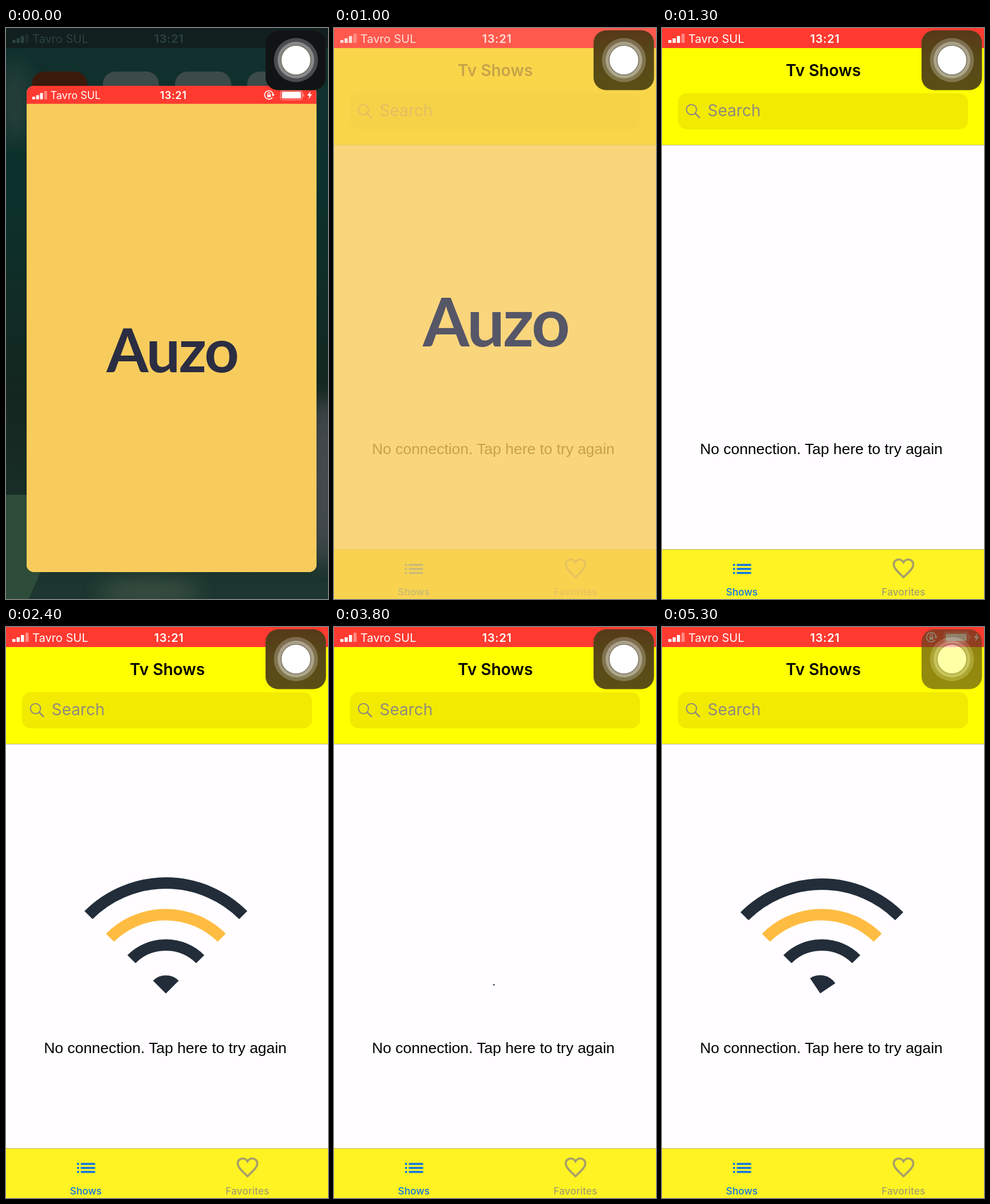
An HTML page for the animation above (5400 ms loop, 562x997 px).

```html
<!DOCTYPE html>
<html lang="en">
<head>
<meta charset="utf-8">
<title>No connection</title>
<style>
  html, body { margin: 0; width: 100%; height: 100%; overflow: hidden; background: #12302b; }
  svg { display: block; width: 100%; height: 100%; }
  text { font-family: Inter, Roboto, sans-serif; }
  .carrier { font-size: 20px; }
  .time { font-size: 20px; font-weight: 600; letter-spacing: .7px; text-anchor: middle; }
  .title { font-size: 28px; font-weight: 600; text-anchor: middle; }
  .search { font-size: 28px; fill: #8f8b7d; }
  .note { font: 26.4px "Liberation Sans", Arial, sans-serif; text-anchor: middle; }
  .tab { font-size: 17px; font-weight: 500; letter-spacing: .2px; text-anchor: middle; }
  .brand { font: 700 117px Lato, sans-serif; letter-spacing: -3px; text-anchor: middle; fill: #2b2d42; }
  .arc { fill: none; stroke: #232d3a; stroke-width: 20; }
</style>
</head>
<body>
<svg viewBox="0 0 562 997" preserveAspectRatio="none">
  <defs>
    <linearGradient id="sea" x2="0" y2="1">
      <stop offset="0" stop-color="#12302e"/>
      <stop offset=".3" stop-color="#0c312c"/>
      <stop offset=".65" stop-color="#14261f"/>
      <stop offset="1" stop-color="#1d3630"/>
    </linearGradient>
    <linearGradient id="glass" x2="0" y2="1">
      <stop offset="0" stop-color="#56391a"/>
      <stop offset=".45" stop-color="#584817"/>
      <stop offset="1" stop-color="#5a4f15"/>
    </linearGradient>
    <filter id="soft" x="-50%" y="-50%" width="200%" height="200%"><feGaussianBlur stdDeviation="16"/></filter>
    <clipPath id="crop"><rect id="cropBox" width="562" height="997"/></clipPath>
    <g id="statusLeft">
      <path d="M11 21h5.500v5h-5.500zM18.500 18h5.500v8h-5.500zM26 14h5.500v12h-5.500z"/>
      <path d="M34 10h5.500v16h-5.500z" opacity=".4"/>
      <text class="carrier" x="46" y="25.500">Tavro SUL</text>
      <text class="time" x="284.500" y="25.500">13:21</text>
    </g>
  </defs>

  <g id="home">
    <rect width="562" height="997" fill="url(#sea)"/>
    <g filter="url(#soft)">
      <ellipse cx="555" cy="790" rx="28" ry="150" fill="#474c50"/>
      <ellipse cx="15" cy="130" rx="30" ry="70" fill="#243d38"/>
      <ellipse cx="250" cy="985" rx="90" ry="22" fill="#38503f"/>
    </g>
    <path d="M0 815h60v135l-20 47h-40z" fill="#2d4c39"/>
    <rect width="562" height="35" fill="#111f1f"/>
    <use href="#statusLeft" fill="#2b4340"/>
    <rect x="45" y="76" width="97" height="97" rx="22" fill="#3b1a0c"/>
    <g fill="#3d4a4a">
      <rect x="169" y="76" width="98" height="97" rx="22"/>
      <rect x="295" y="76" width="98" height="97" rx="22"/>
      <rect x="421" y="76" width="98" height="97" rx="22"/>
    </g>
  </g>

  <g id="card"><g clip-path="url(#crop)">
    <rect width="562" height="997" fill="#fffdff"/>
    <rect y="35" width="562" height="169" fill="#ff0"/>
    <path d="M0 204.500h562" stroke="#b9b7a0"/>
    <text class="title" x="281.500" y="84">Tv Shows</text>
    <rect x="28" y="114" width="506" height="63" rx="15" fill="#f2ea00"/>
    <g fill="none" stroke="#8f8b7d" stroke-width="2">
      <circle cx="51.500" cy="142.500" r="8.800"/>
      <path d="M58 149l8 8" stroke-width="2.500"/>
    </g>
    <text class="search" x="79.500" y="154">Search</text>

    <g id="wifi">
      <path class="arc" pathLength="1" d="M219 580A85 85 0 0 1 339 580"/>
      <path class="arc" pathLength="1" d="M181.500 542.500A138 138 0 0 1 376.500 542.500" style="stroke:#ffbc42"/>
      <path class="arc" pathLength="1" d="M144 505A191 191 0 0 1 414 505"/>
    </g>
    <path id="dot" d="M279 640L256.500 617.500A31.800 31.800 0 0 1 301.500 617.500Z" fill="#232d3a"/>
    <text class="note" x="278" y="744">No connection. Tap here to try again</text>

    <rect y="910" width="562" height="87" fill="#fff324"/>
    <path d="M0 910.500h562" stroke="#b9b26a"/>
    <path d="M124 937.500h3.500M130.500 937.500h25M124 944.500h3.500M130.500 944.500h25M124 951.500h3.500M130.500 951.500h25" stroke="#0b74e5" stroke-width="3.400"/>
    <path d="M421.500 959C411 949 404.500 943.500 404.500 936.500C404.500 931.500 408.500 928 413 928C416.500 928 419.500 930 421.500 933C423.500 930 426.500 928 430 928C434.500 928 438.500 931.500 438.500 936.500C438.500 943.500 432 949 421.500 959Z" fill="none" stroke="#a69e68" stroke-width="3.600"/>
    <text class="tab" x="139.500" y="991" fill="#0b74e5">Shows</text>
    <text class="tab" x="421.500" y="991" fill="#a69e68">Favorites</text>

    <g id="splash">
      <rect y="35" width="562" height="962" fill="#f8cc5c"/>
      <text class="brand" x="282" y="556">Auzo</text>
    </g>

    <rect width="562" height="35" fill="#ff3a30"/>
    <use href="#statusLeft" fill="#fff"/>
    <g fill="none" stroke="#fff" stroke-width="1.800">
      <path d="M476.500 22.500A8.200 8.200 0 1 1 478 17"/>
      <path d="M475 16.500h6l-3 4z" fill="#fff" stroke="none"/>
      <path d="M466.500 17h7v5h-7z" fill="#fff" stroke="none"/>
      <path d="M467.800 17v-2a2.200 2.200 0 0 1 4.400 0v2" stroke-width="1.400"/>
      <rect x="492.500" y="9" width="42" height="18" rx="4" stroke-opacity=".5" stroke-width="1.500"/>
      <rect x="495" y="11.500" width="37" height="13" rx="2" fill="#fff" stroke="none"/>
      <path d="M537 15v6" stroke-opacity=".5"/>
      <path d="M551 10l-7 9h4.200l-1.700 7l7-9.500h-4.200z" fill="#fff" stroke="none"/>
    </g>
    <rect id="flash" width="562" height="35" fill="#ff998c"/>
  </g></g>

  <g id="button">
    <rect x="453" y="4" width="105.500" height="104.500" rx="22" fill="url(#glass)"/>
    <rect id="shade" x="453" y="4" width="105.500" height="104.500" rx="22" fill="#111415"/>
    <circle cx="506" cy="56" r="38.500" fill="#fff" opacity=".24"/>
    <circle cx="506" cy="56" r="32" fill="#fff" opacity=".34"/>
    <circle cx="506" cy="56" r="25.800" fill="#fff" stroke="#5b5640" stroke-opacity=".7" stroke-width="1.500"/>
  </g>
</svg>
<script>
  const LOOP = 5400, TICK = 100;
  const $ = id => document.getElementById(id);
  const arcs = [...document.querySelectorAll('.arc')];
  const set = (el, attrs) => { for (const k in attrs) el.setAttribute(k, attrs[k]); };
  const ramp = (t, start, length) => Math.min(1, Math.max(0, (t - start) / length));
  const smooth = p => p * p * (3 - 2 * p);
  const backOut = p => 1 + 2.7 * (p - 1) ** 3 + 1.7 * (p - 1) ** 2;

  // App window growing out of the home screen
  function launch(t) {
    const k = t < 500 ? Math.exp(-t / 67) : 0;
    const scale = 1 - 0.1 * k;
    set($('card'), { transform: `translate(${36 * k} ${101 * k}) scale(${scale})` });
    set($('cropBox'), { height: 997 - 54 * k, rx: 14 * k });
    set($('home'), { visibility: k ? 'visible' : 'hidden' });
    set($('shade'), { opacity: 1 - ramp(t, 0, 110) });
  }

  function fadeSplash(t) {
    const a = 1 - smooth(ramp(t, 880, 420));
    set($('splash'), { opacity: a });
    set($('flash'), { opacity: 2 * a * (1 - a) });
  }

  // Dot pops in and sways, the arcs rise one after another, then all close again
  function drawWifi(t) {
    const age = t < 3780 ? t - 1320 : t - 3780;
    const size = Math.min(ramp(age, 0, 240), 1 - ramp(age, 2050, 200));
    const sway = 11 * Math.sin(Math.PI * (age - 1080) / 880);
    set($('dot'), {
      transform: `translate(279 625) rotate(${sway}) scale(${size}) translate(-279 -625)`,
      visibility: size ? 'visible' : 'hidden'
    });
    arcs.forEach((arc, i) => {
      const p = ramp(age, 190 + 300 * i, 500);
      const open = Math.min(smooth(ramp(p, 0, 0.5)), 1 - smooth(ramp(age, 1900 - 100 * i, 300)));
      set(arc, {
        transform: `translate(0 ${20 * (1 - backOut(p))})`,
        visibility: open ? 'visible' : 'hidden',
        'stroke-dasharray': open < 1 ? `${open} 2` : 'none',
        'stroke-dashoffset': (open - 1) / 2
      });
    });
  }

  function frame(now) {
    const t = Math.floor(now % LOOP / TICK) * TICK;
    launch(t);
    fadeSplash(t);
    drawWifi(t);
    set($('button'), { opacity: 1 - 0.35 * ramp(t, 5100, 200) });
    requestAnimationFrame(frame);
  }
  frame(performance.now());
</script>
</body>
</html>
```
